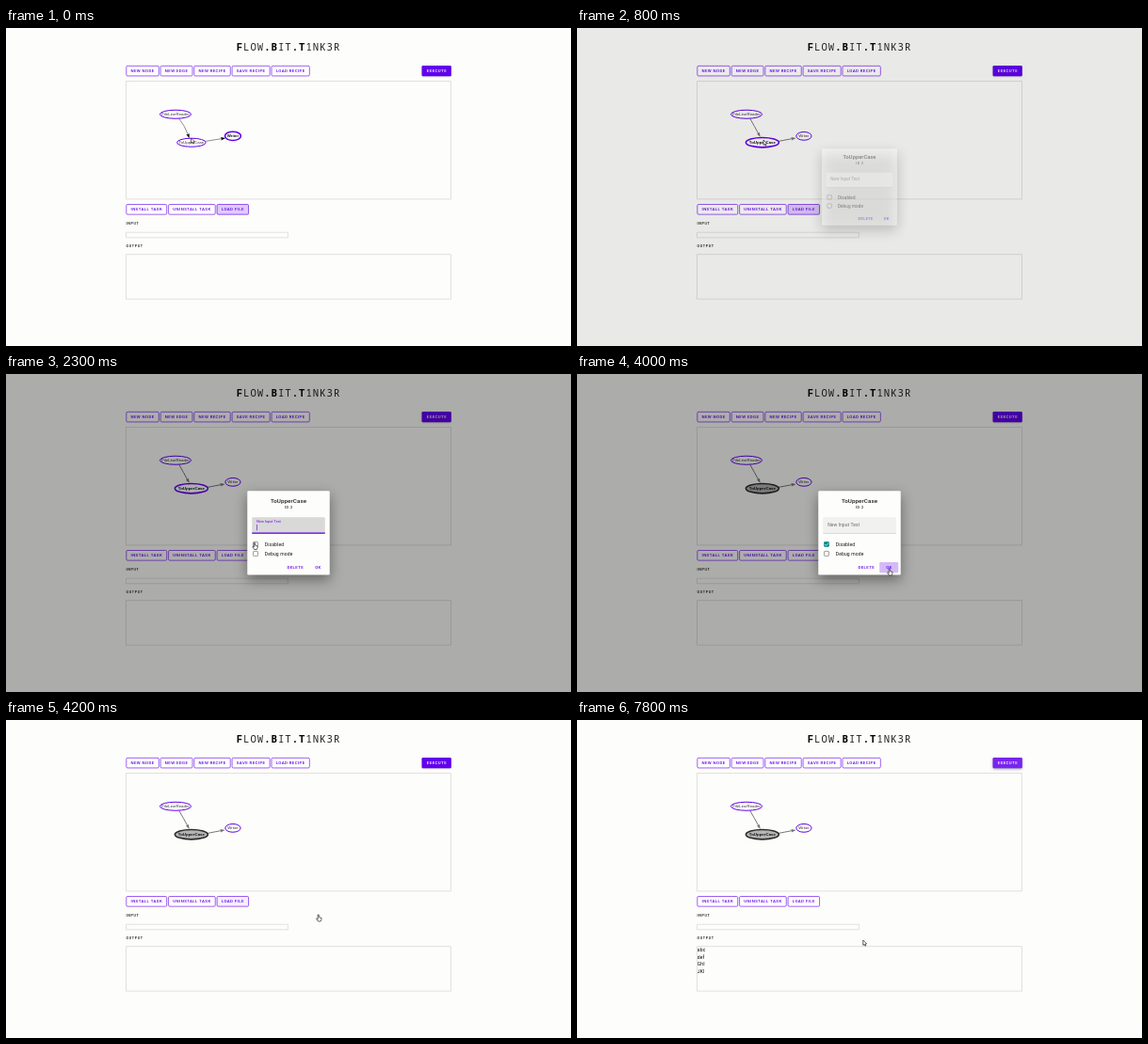
An HTML page with a canvas that plays this animation: 600x338 px, repeating every 7900 ms.

```html
<!DOCTYPE html>
<html lang="en">
<head>
<meta charset="utf-8">
<title>Recipe editor</title>
<style>
  html, body { margin: 0; width: 100%; height: 100%; overflow: hidden; background: #fdfdfb; }
  canvas { display: block; width: 100vw; height: 100vh; }
</style>
</head>
<body>
<canvas id="stage" width="600" height="338"></canvas>
<script>
const LOOP = 7900;
const S = 0.3125; // layout is measured on a 1920 px wide page
const PURPLE = '#6200ee';
const PAPER = '#fdfdfb';
const ROBOTO = 'Roboto, sans-serif';
const c = document.getElementById('stage').getContext('2d');

const clamp = v => Math.max(0, Math.min(1, v));
const ramp = (t, from, to) => clamp((t - from) / (to - from));
const within = (t, from, to) => t >= from && t < to;

function text(str, x, y, { size = 14, weight = 400, gap = 0, color = '#000', align = 'left', family = ROBOTO } = {}) {
  c.font = `${weight} ${size}px ${family}`;
  c.letterSpacing = gap + 'px';
  c.fillStyle = color;
  c.textAlign = 'left';
  c.textBaseline = 'alphabetic';
  const w = c.measureText(str).width;
  c.fillText(str, align === 'center' ? x - (w - gap) / 2 : x, y);
  return w;
}

function box(x, y, w, h, { r = 0, fill, stroke, line = 2 } = {}) {
  c.beginPath();
  c.roundRect(x, y, w, h, r);
  if (fill) { c.fillStyle = fill; c.fill(); }
  if (stroke) { c.strokeStyle = stroke; c.lineWidth = line; c.stroke(); }
}

function shadow(alpha, blur, dy) {
  c.shadowColor = `rgba(0,0,0,${alpha})`;
  c.shadowBlur = blur;
  c.shadowOffsetY = dy;
}

const LABEL = { weight: 500, gap: 1.25 };

function outlined(label, x, y, tint = 0) {
  c.font = `500 14px ${ROBOTO}`;
  c.letterSpacing = '1.25px';
  const w = c.measureText(label).width + 32;
  box(x + 1, y + 1, w - 2, 34, { r: 4, fill: '#fff', stroke: PURPLE });
  if (tint) box(x, y, w, 36, { r: 4, fill: `rgba(98,0,238,${tint})` });
  text(label, x + 16, y + 23, { ...LABEL, color: PURPLE });
  return x + w + 4;
}

function title() {
  let x = 783;
  for (const [part, bold] of [['F', 1], ['LOW', 0], ['.B', 1], ['IT', 0], ['.T', 1], ['1NK3R', 0]]) {
    x += text(part, x, 77, {
      size: 34, weight: bold ? 900 : 200, gap: 3.2, color: bold ? '#000' : '#222',
      family: '"Noto Sans Mono", monospace'
    });
  }
}

function execute(t) {
  const hover = ramp(t, 5450, 5550) * 0.08 + ramp(t, 5750, 5850) * 0.16 - ramp(t, 6500, 6650) * 0.1;
  const lift = Math.max(ramp(t, 5450, 5600) * (1 - ramp(t, 6500, 6700) * 0.5), 0);
  c.save();
  shadow(0.25 + lift * 0.2, 1.5 + lift * 3, 0.5 + lift);
  box(1413, 128, 100, 36, { r: 4, fill: PURPLE });
  c.restore();
  if (hover > 0) box(1413, 128, 100, 36, { r: 4, fill: `rgba(255,255,255,${hover})` });
  text('EXECUTE', 1463, 151, { ...LABEL, color: '#fff', align: 'center' });
}

function edge(x1, y1, cx, cy, x2, y2, color, head, line) {
  const a = Math.atan2(y2 - cy, x2 - cx);
  const len = 16;
  c.strokeStyle = color;
  c.lineWidth = line;
  c.beginPath();
  c.moveTo(x1, y1);
  c.quadraticCurveTo(cx, cy, x2 - len * 0.8 * Math.cos(a), y2 - len * 0.8 * Math.sin(a));
  c.stroke();
  c.save();
  c.translate(x2, y2);
  c.rotate(a);
  c.fillStyle = head;
  c.beginPath();
  c.moveTo(0, 0);
  c.lineTo(-len, 5.5);
  c.lineTo(-len * 0.85, 0);
  c.lineTo(-len, -5.5);
  c.fill();
  c.restore();
}

function node(label, x, y, rx, ry, { picked = false, off = false } = {}) {
  c.beginPath();
  c.ellipse(x, y, rx, ry, 0, 0, Math.PI * 2);
  c.fillStyle = off ? '#b4b4b4' : '#fff';
  c.fill();
  c.strokeStyle = off ? '#2b2b2b' : PURPLE;
  c.lineWidth = picked ? 5 : 3.2;
  c.stroke();
  text(label, x, y + 4.5, {
    weight: picked ? 700 : 400, color: picked ? '#111' : '#343434',
    align: 'center', family: '"Liberation Sans", Arial, sans-serif'
  });
}

function graph(t) {
  const picked = t >= 300;
  const off = t >= 2700;
  const line = picked ? '#777' : '#444';
  const head = picked ? '#707070' : '#000';
  const width = picked ? 3.2 : 1.9;
  edge(588, 308, picked ? 604 : 608, picked ? 336 : 333, 623, picked ? 371 : 375, line, head, width);
  edge(picked ? 686 : 679, 385, 712, 380, picked ? 744 : 746, 374, line, head, width);
  node('FileLineReader', 576, 293.5, 53, 14.5);
  node('ToUpperCase', 630, 389.5, picked ? 56 : 49, picked ? 16.5 : 14.5, { picked, off });
  node('Writer', 771, 367.5, picked ? 26 : 27, picked ? 14 : 15, { picked: !picked });
}

function page(t) {
  title();
  let x = 408;
  for (const name of ['NEW NODE', 'NEW EDGE', 'NEW RECIPE', 'SAVE RECIPE', 'LOAD RECIPE']) x = outlined(name, x, 128);
  execute(t);

  const frame = { stroke: '#cfcfcf' };
  box(408, 181, 1104, 401, frame);
  graph(t);

  const focus = t < 4000 ? 0.2 * (1 - ramp(t, 930, 1050))
    : 0.2 * ramp(t, 4150, 4320) * (1 - ramp(t, 5700, 5800));
  x = outlined('INSTALL TASK', 408, 599);
  x = outlined('UNINSTALL TASK', x, 599);
  outlined('LOAD FILE', x, 599, focus);

  const caption = { size: 12, weight: 500, gap: 2, color: '#111' };
  text('INPUT', 408, 670, caption);
  box(408, 695, 550, 18, frame);
  text('OUTPUT', 408, 746, caption);
  box(408, 770, 1104, 152, frame);
  if (t >= 5900) {
    ['abc', 'def', 'GhI', 'JKl'].forEach((row, i) => text(row, 409, 788 + i * 24, { size: 16, gap: 0.5 }));
  }
}

function checkbox(label, y, on) {
  box(840, y - 8, 16, 16, { r: 2, fill: on ? '#018786' : null, stroke: on ? '#018786' : '#6b6b6b' });
  if (on) {
    c.strokeStyle = '#fff';
    c.lineWidth = 2.4;
    c.beginPath();
    c.moveTo(842, y);
    c.lineTo(846.5, y + 4.5);
    c.lineTo(854.5, y - 4);
    c.stroke();
  }
  text(label, 879, y + 6, { size: 16, gap: 0.5, color: '#111' });
}

function field(t) {
  const f = ramp(t, 1000, 1150) * (1 - ramp(t, 2650, 2800));
  const shade = Math.round(241 - 24 * f);
  box(836, 487, 248, 56, { r: [4, 4, 0, 0], fill: `rgb(${shade},${shade},${shade - 2})` });
  box(836, 542, 248, 1, { fill: '#8f8f8f' });
  if (f > 0) {
    const half = 124 * f;
    box(960 - half, 539.5, half * 2, 3.5, { fill: PURPLE });
  }
  text('New Input Text', 852, 518 - 13 * f, {
    size: 16 - 4 * f, gap: 0.15, color: f > 0.5 ? PURPLE : '#6c6c6c'
  });
  if (f === 1 && (t - 1000) % 1000 < 500) box(852, 512, 2, 20, { fill: PURPLE });
}

function dialog(t) {
  if (!within(t, 765, 4150)) return;
  const gone = ramp(t, 4060, 4135);
  c.fillStyle = `rgba(0,0,0,${0.32 * ramp(t, 765, 915) * (1 - gone)})`;
  c.fillRect(0, 0, 1920, 1082);

  const scale = 1 - 0.2 * (1 - ramp(t, 765, 915)) ** 3;
  c.save();
  c.globalAlpha = ramp(t, 765, 840) * (1 - gone);
  c.translate(960, 540.5);
  c.scale(scale, scale);
  c.translate(-960, -540.5);
  c.save();
  shadow(0.42, 14, 5);
  box(820, 397.5, 280, 286, { r: 4, fill: PAPER });
  c.restore();

  text('ToUpperCase', 960, 437, { size: 20, weight: 500, gap: 0.25, color: '#222', align: 'center' });
  text('ID 2', 960, 458, { size: 12, weight: 500, gap: 2, color: '#222', align: 'center' });
  field(t);
  checkbox('Disabled', 579, t >= 2700);
  checkbox('Debug mode', 611, false);

  const press = ramp(t, 3550, 3650) * 0.06 + ramp(t, 3850, 3950) * 0.2;
  if (press) box(1028, 640, 64, 36, { r: 4, fill: `rgba(98,0,238,${press})` });
  text('DELETE', 955, 663, { ...LABEL, color: PURPLE });
  text('OK', 1060, 663, { ...LABEL, color: PURPLE, align: 'center' });
  c.restore();
}

// time, x, y of the pointer tip in stage pixels
const PATH = [
  [0, 196.5, 117], [400, 198, 119], [1200, 198, 119], [2000, 264, 179.5], [2800, 264, 179.5],
  [3700, 331.8, 207], [4900, 331.8, 207], [5550, 453, 50.5], [6450, 453, 50.5], [7150, 303.8, 234], [LOOP, 303.8, 234]
];

function pointer(t) {
  const i = PATH.findIndex(p => p[0] > t);
  const [t0, x0, y0] = PATH[i - 1];
  const [t1, x1, y1] = PATH[i];
  const p = ramp(t, t0, t1);
  const e = p * p * (3 - 2 * p);
  const hand = within(t, 1900, 2850) || within(t, 3550, 5000) || within(t, 5450, 6550);
  c.save();
  c.translate(x0 + (x1 - x0) * e, y0 + (y1 - y0) * e);
  c.beginPath();
  const shape = hand
    ? [[-0.7, 0], [0.4, 0], [0.6, 2.6], [3.2, 3.4], [3.1, 5.3], [2.3, 7], [-0.4, 7], [-2.2, 4.2], [-1.6, 3.6], [-0.6, 4.6]]
    : [[0, 0], [0, 5.4], [1.3, 4.3], [2.2, 6.2], [3, 5.8], [2.2, 4], [3.8, 3.8]];
  shape.forEach(([x, y]) => c.lineTo(x, y));
  c.closePath();
  c.fillStyle = '#fff';
  c.fill();
  c.strokeStyle = '#222';
  c.lineWidth = 0.7;
  c.lineJoin = 'round';
  c.stroke();
  c.restore();
}

function draw(t) {
  c.setTransform(1, 0, 0, 1, 0, 0);
  c.fillStyle = PAPER;
  c.fillRect(0, 0, 600, 338);
  c.scale(S, S);
  page(t);
  dialog(t);
  c.setTransform(1, 0, 0, 1, 0, 0);
  pointer(t);
}

const start = performance.now();
function tick() {
  draw((performance.now() - start) % LOOP);
  requestAnimationFrame(tick);
}
tick();
</script>
</body>
</html>
```
